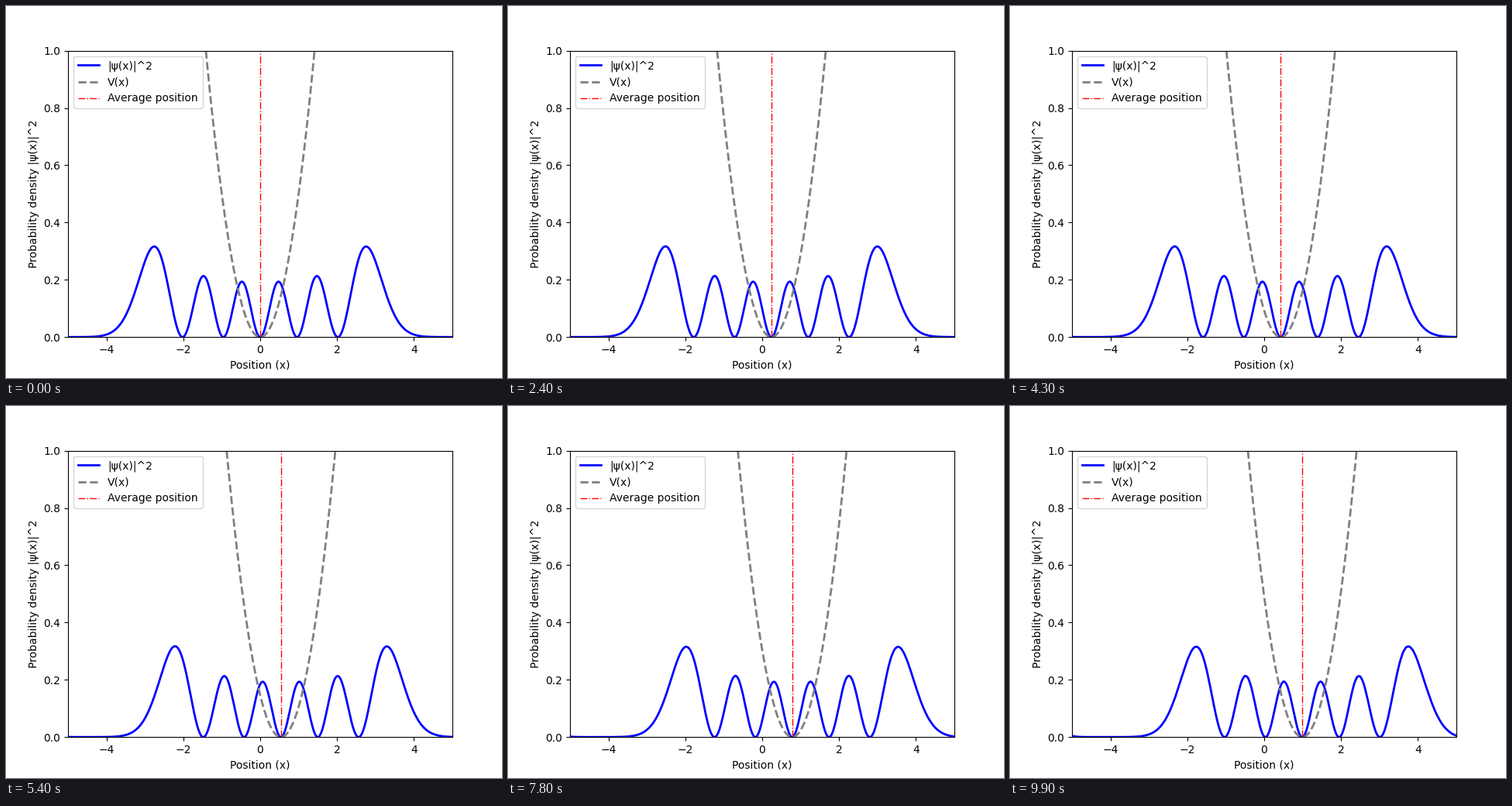
These frames come from a looping animation (640x480 px, 10000 ms). A matplotlib script:

```python
import matplotlib.pyplot as plt
import numpy as np
from matplotlib.animation import FuncAnimation

FRAMES = 100
SPEED = 1.0
DT = 0.01
SUB = 4

x = np.linspace(-5, 5, 1000)
dx = x[1] - x[0]
k = 2 * np.pi * np.fft.fftfreq(x.size, dx)


def potential(t):
    return 0.5 * (x - SPEED * t) ** 2


def evolve():
    """Boosted fifth oscillator state in a well moving at constant speed."""
    hermite = np.polynomial.hermite.hermval(x, [0, 0, 0, 0, 0, 1])
    psi = hermite * np.exp(-x**2 / 2 + 1j * SPEED * x)
    psi /= np.sqrt(np.sum(abs(psi) ** 2) * dx)
    h = DT / SUB
    kinetic = np.exp(-0.5j * h * k**2)
    states = []
    for n in range(FRAMES):
        states.append(abs(psi) ** 2)
        for s in range(SUB):
            half = np.exp(-0.5j * h * potential(n * DT + (s + 0.5) * h))
            psi = half * np.fft.ifft(kinetic * np.fft.fft(half * psi))
    return states


density = evolve()

fig, ax = plt.subplots(figsize=(6.4, 4.8), dpi=100)
wave, = ax.plot([], [], color="blue", lw=2, label="|ψ(x)|^2")
well, = ax.plot([], [], color="gray", ls="--", lw=2, label="V(x)")
mean = ax.axvline(0, color="red", ls="-.", lw=1, label="Average position")
ax.set_xlim(-5, 5)
ax.set_ylim(0, 1)
ax.set_xlabel("Position (x)")
ax.set_ylabel("Probability density |ψ(x)|^2")
ax.legend(loc="upper left")


def update(n):
    rho = density[n]
    center = np.sum(x * rho) * dx
    wave.set_data(x, rho)
    well.set_data(x, potential(n * DT))
    mean.set_xdata([center, center])
    return wave, well, mean


anim = FuncAnimation(fig, update, frames=FRAMES, interval=100, repeat=True)
plt.show()
```
